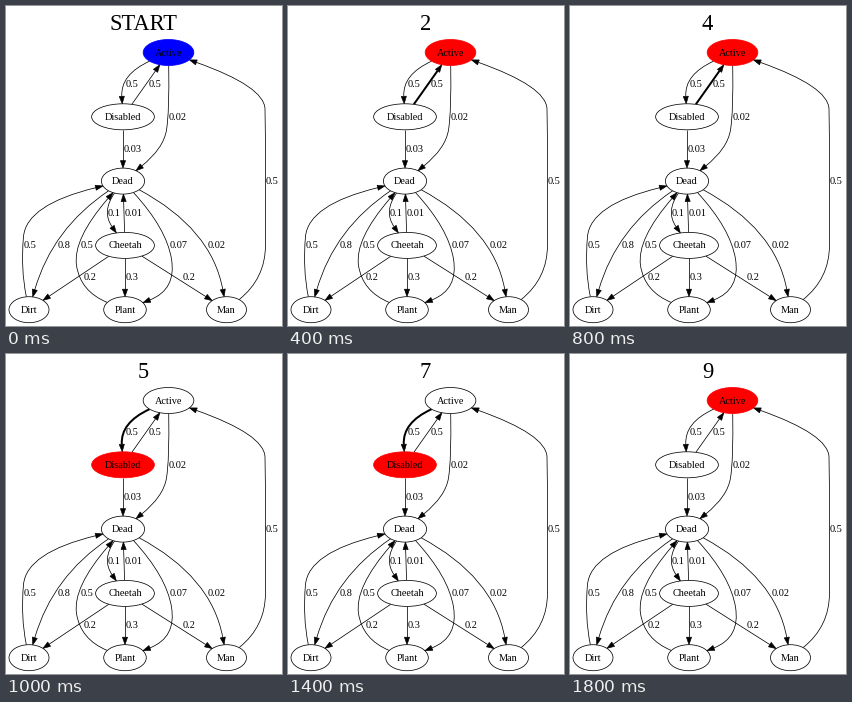
Animation of 276 by 320 pixels, one loop 2 s. Source, as a matplotlib script:

```python
import numpy as np
import matplotlib.pyplot as plt
from matplotlib.animation import FuncAnimation
from matplotlib.patches import Ellipse, PathPatch, Polygon
from matplotlib.path import Path
from matplotlib.textpath import TextPath

W, H, DPI = 276, 320, 64
PT = 72 / DPI  # points per pixel
THIN, BOLD = 0.75, 2
FONT = 10.3
plt.rcParams["font.family"] = "Liberation Serif"

# name: centre x and row
NODES = {
    "Active": (162, 0), "Disabled": (116.5, 1), "Dead": (116.5, 2),
    "Cheetah": (118.5, 3), "Dirt": (22.5, 4), "Plant": (118.5, 4), "Man": (220, 4),
}

# tail, head, label, points that bend the edge
EDGES = [
    ("Active", "Disabled", "0.5", (114, 68)),
    ("Disabled", "Active", "0.5"),
    ("Active", "Dead", "0.02", (163, 105), (157, 142)),
    ("Disabled", "Dead", "0.03"),
    ("Dead", "Cheetah", "0.1", (95, 205)),
    ("Cheetah", "Dead", "0.01"),
    ("Dirt", "Dead", "0.5", (14, 262), (20, 198)),
    ("Dead", "Dirt", "0.8", (46, 222)),
    ("Plant", "Dead", "0.5", (74, 285), (66, 233)),
    ("Dead", "Plant", "0.07", (160, 222), (170, 283)),
    ("Dead", "Man", "0.02", (205, 222)),
    ("Cheetah", "Dirt", "0.2"),
    ("Cheetah", "Plant", "0.3"),
    ("Cheetah", "Man", "0.2"),
    ("Man", "Active", "0.5", (259, 272), (259, 205), (259, 125), (258, 80)),
]

fig = plt.figure(figsize=(W / DPI, H / DPI), dpi=DPI, facecolor="white")
ax = fig.add_axes([0, 0, 1, 1])
ax.set_xlim(-0.5, W - 0.5)
ax.set_ylim(H - 0.5, -0.5)
ax.axis("off")


def write(x, y, text, size=FONT, ha="center"):
    return ax.text(x, y, text, size=size * PT, ha=ha, va="baseline", zorder=4)


def add_node(name, x, row):
    """An oval as wide as its name needs; rows are evenly spaced."""
    y = 46 + 64.3 * row
    text_width = TextPath((0, 0), name, size=FONT).get_extents().width
    size = max(40, 15.3 + 1.31 * text_width), 26
    write(x, y + 3, name)
    return ax.add_patch(Ellipse((x, y), *size, lw=THIN * PT, zorder=2))


def rim(oval, toward):
    """Where the ray from the oval's centre to a point leaves the oval."""
    centre = np.array(oval.center)
    ray = np.array(toward) - centre
    return centre + ray / np.hypot(*(2 * ray / (oval.width, oval.height)))


def smooth(points):
    """Quadratic spline that takes the inner points as its corners."""
    first, *bends, last = points
    if not bends:
        return Path([first, last])
    verts = [first, bends[0]]
    for a, b in zip(bends, bends[1:]):
        verts += [(a + b) / 2, b]
    verts.append(last)
    return Path(verts, [Path.MOVETO] + [Path.CURVE3] * (len(verts) - 1))


def add_edge(tail, head, label, *bends, length=7.5, half=2.6):
    a, b = ovals[tail], ovals[head]
    start = rim(a, bends[0] if bends else b.center)
    before = np.array(bends[-1] if bends else a.center)
    tip = rim(b, before)
    way = (tip - before) / np.hypot(*(tip - before))
    base = tip - length * way
    side = half * way[::-1] * (-1, 1)
    path = smooth([start, *map(np.array, bends), base])
    ax.add_patch(Polygon([base + side, tip, base - side], fc="black", ec="black",
                         lw=0.6 * PT, zorder=3))

    # the label sits halfway down, further off where the edge is slanted
    xs, ys = path.to_polygons(closed_only=False)[0].T
    order = np.argsort(ys)
    mid = (a.center[1] + b.center[1]) / 2
    low, x, high = np.interp([mid - 4, mid, mid + 4], ys[order], xs[order])
    write(x + 0.5 + abs(high - low) / 2, mid + 2.7, label, ha="left")
    return ax.add_patch(PathPatch(path, fill=False, lw=THIN * PT, zorder=1))


ovals = {name: add_node(name, *place) for name, place in NODES.items()}
lines = {edge[:2]: add_edge(*edge) for edge in EDGES}
title = write(137, 24, "", 22.5)

STATES = ["Active", "Disabled"] * 4 + ["Active", "Active"]


def update(step):
    state = STATES[step]
    title.set_text(str(step) if step else "START")
    fill = "red" if step else "blue"
    for name, oval in ovals.items():
        oval.set_facecolor(fill if name == state else "white")
        oval.set_edgecolor(fill if name == state else "black")
    move = (STATES[step - 1], state) if step else None
    for ends, line in lines.items():
        line.set_linewidth((BOLD if ends == move else THIN) * PT)
    return [title, *ovals.values(), *lines.values()]


anim = FuncAnimation(fig, update, frames=len(STATES), interval=200,
                     repeat=True, repeat_delay=0, blit=False)
plt.show()
```
